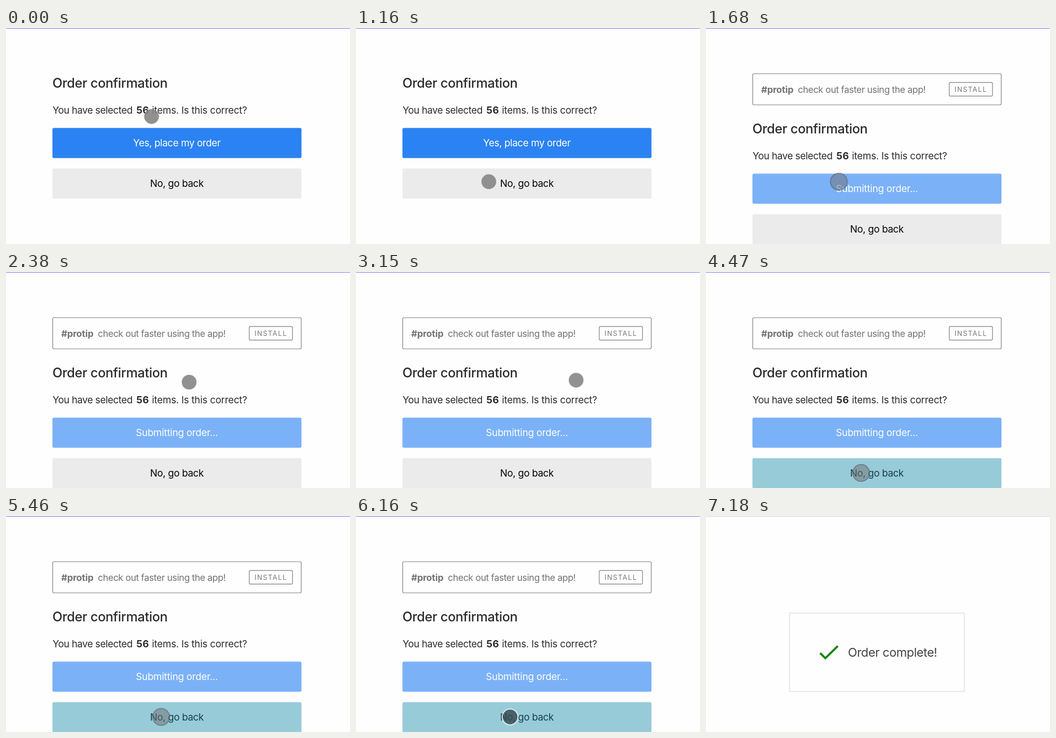
An HTML page for the animation above (7.28 s loop, 663 px wide and 416 px high).

```html
<!DOCTYPE html>
<html lang="en">
<head>
<meta charset="utf-8">
<title>Order confirmation</title>
<style>
  html, body { margin: 0; width: 100%; height: 100%; overflow: hidden; background: #fefefe; }
  svg { display: block; width: 663px; height: 416px; }
  text { font-family: Inter, "Liberation Sans", sans-serif; font-optical-sizing: none; }
  .title { font-size: 25.2px; font-weight: 540; letter-spacing: -.36px; fill: #2b2b2b; }
  .body { font-size: 18.7px; font-weight: 440; letter-spacing: -.34px; fill: #2b2b2b; }
  .tip { font-size: 17.8px; letter-spacing: -.46px; fill: #727272; }
  .bold { font-weight: 700; letter-spacing: -.15px; }
  .loose { letter-spacing: -.22px; }
  .label { text-anchor: middle; }
  .outline { fill: none; stroke: #7b7b7b; stroke-width: 1.2; }
</style>
</head>
<body>
<svg viewBox="0 0 663 416">
  <rect width="663" height="416" fill="#fefefe"/>
  <rect id="topLine" width="663"/>

  <g id="page">
    <g id="banner">
      <rect class="outline" x="90" y="88" width="479" height="60" rx="2.5"/>
      <text class="tip bold" x="106.5" y="124.5">#protip</text>
      <text class="tip" x="177" y="124.5">check out faster using the app!</text>
      <rect class="outline" x="468.8" y="104.8" width="83.4" height="26.4" rx="2.5"/>
      <text x="479" y="123.3" font-size="13" letter-spacing="1.5" fill="#777">INSTALL</text>
    </g>
    <g id="form">
      <text class="title" x="89.5" y="115.3">Order confirmation</text>
      <text class="body" x="89.7" y="165" style="letter-spacing:-.44px">You have selected</text>
      <text class="body bold" x="251.3" y="165" font-size="19.4" style="letter-spacing:.3px">56</text>
      <text class="body loose" x="281.3" y="165">items. Is this correct?</text>
      <rect id="yes" x="89.5" y="192.5" width="480" height="58" rx="3"/>
      <text id="yesText" class="body label" x="329.3" y="228.3" style="fill:#fff"></text>
      <rect id="no" x="89.5" y="270.5" width="480" height="58" rx="3"/>
      <text id="noText" class="body label" x="329.3" y="306.3">No, go back</text>
    </g>
    <circle id="cursor"/>
  </g>

  <g id="done">
    <rect x="161" y="187" width="337" height="151" fill="#fefefe" stroke="#dedede" stroke-width="1.4"/>
    <path d="M220 264 L230 274 L254 250.5" fill="none" stroke="#168516" stroke-width="4"/>
    <text x="273.5" y="271" font-size="23.5" letter-spacing="-.53" fill="#444">Order complete!</text>
  </g>
</svg>
<script>
  const LOOP = 7280;
  const BANNER_AT = 1280, SUBMIT_AT = 1460;
  const $ = id => document.getElementById(id);
  const clamp = v => Math.min(1, Math.max(0, v));
  const ramp = (t, from, to) => clamp((t - from) / (to - from));
  const smooth = u => u * u * (3 - 2 * u);
  const lerp = (a, b, u) => a + (b - a) * u;
  const mix = (a, b, u) => a.map((v, i) => lerp(v, b[i], u));
  const rgb = c => `rgb(${c.map(Math.round)})`;
  const rgba = (c, alpha) => `rgba(${c.map(Math.round)},${alpha})`;
  const set = (id, attrs) => {
    for (const name in attrs) $(id).setAttribute(name, attrs[name]);
  };

  const BLUE = [43, 130, 242], PALE_BLUE = [123, 177, 247];
  const GREY = [235, 235, 235], TEAL = [152, 203, 216];

  // Pointer wander: [time, x, y], joined by a smooth curve.
  const wander = [
    [1880, 256, 296], [2120, 296, 262], [2380, 353, 212], [2530, 290, 300],
    [2650, 226, 384], [2800, 180, 320], [2960, 275, 150], [3090, 412, 150],
    [3230, 405, 300], [3400, 299, 387]
  ];

  // Clicks after the pointer settles: [start, end].
  const clicks = [[3500, 3680], [4180, 4460], [4780, 5100], [5600, 5800], [6040, 6300]];

  function curve(points, t) {
    const at = i => points[Math.min(points.length - 1, Math.max(0, i))];
    let i = 0;
    while (i < points.length - 2 && t > at(i + 1)[0]) i++;
    const u = ramp(t, at(i)[0], at(i + 1)[0]);
    return [1, 2].map(k => {
      const [a, b, c, d] = [-1, 0, 1, 2].map(n => at(i + n)[k]);
      return b + u * (c - a + u * (2 * a - 5 * b + 4 * c - d + u * (3 * (b - c) + d - a))) / 2;
    });
  }

  function pointer(t) {
    if (t < 1880) {
      const u = smooth(ramp(t, 340, 870));
      return [lerp(280.5, 256, u), lerp(170.5, 296, u)];
    }
    const [x, y] = curve(wander, t);
    return [x - 2 * ramp(t, 5500, 6100), y];
  }

  const pulse = (t, [from, to]) => ramp(t, from, from + 60) * (1 - ramp(t, to - 60, to));

  function drawCursor(t) {
    const [cx, cy] = pointer(t);
    const soft = Math.max(
      ramp(t, 1160, 1240) * (1 - ramp(t, 1760, 1860)),
      ramp(t, 3420, 3520)
    );
    const press = Math.max(...clicks.map(c => pulse(t, c)));
    const fill = mix(mix([133, 133, 133], [112, 112, 112], soft), [55, 75, 80], press);
    const edge = mix([85, 90, 105], [245, 250, 250], press);
    set("cursor", {
      cx, cy,
      r: lerp(lerp(14.2, 16.2, soft), 15.2, press),
      fill: rgba(fill, lerp(lerp(.9, .5, soft), .82, press)),
      stroke: rgba(edge, lerp(.55 * soft, .85, press)),
      "stroke-width": 2
    });
  }

  function draw(t) {
    const shifted = t >= BANNER_AT;
    const submitted = t >= SUBMIT_AT;
    const picked = ramp(t, 3460, 3700);
    const complete = ramp(t, 6300, 6900);
    const settled = ramp(t, 6990, 7180);

    set("banner", { visibility: shifted ? "visible" : "hidden" });
    set("form", { transform: `translate(0 ${shifted ? 88 : 0})` });
    set("yes", { fill: rgb(mix(BLUE, PALE_BLUE, ramp(t, SUBMIT_AT, SUBMIT_AT + 160))) });
    $("yesText").textContent = submitted ? "Submitting order..." : "Yes, place my order";
    $("yesText").classList.toggle("loose", submitted);
    set("no", { fill: rgb(mix(GREY, TEAL, picked)) });
    $("noText").style.fill = rgb(mix([0, 0, 0], [20, 62, 74], picked));
    drawCursor(t);

    set("page", { opacity: 1 - complete });
    set("done", { opacity: complete });
    set("topLine", {
      height: lerp(1.2, 2, settled),
      fill: rgb(mix([134, 144, 242], [230, 230, 230], settled))
    });
  }

  const start = performance.now();
  function tick() {
    draw((performance.now() - start) % LOOP);
    requestAnimationFrame(tick);
  }
  tick();
</script>
</body>
</html>
```
